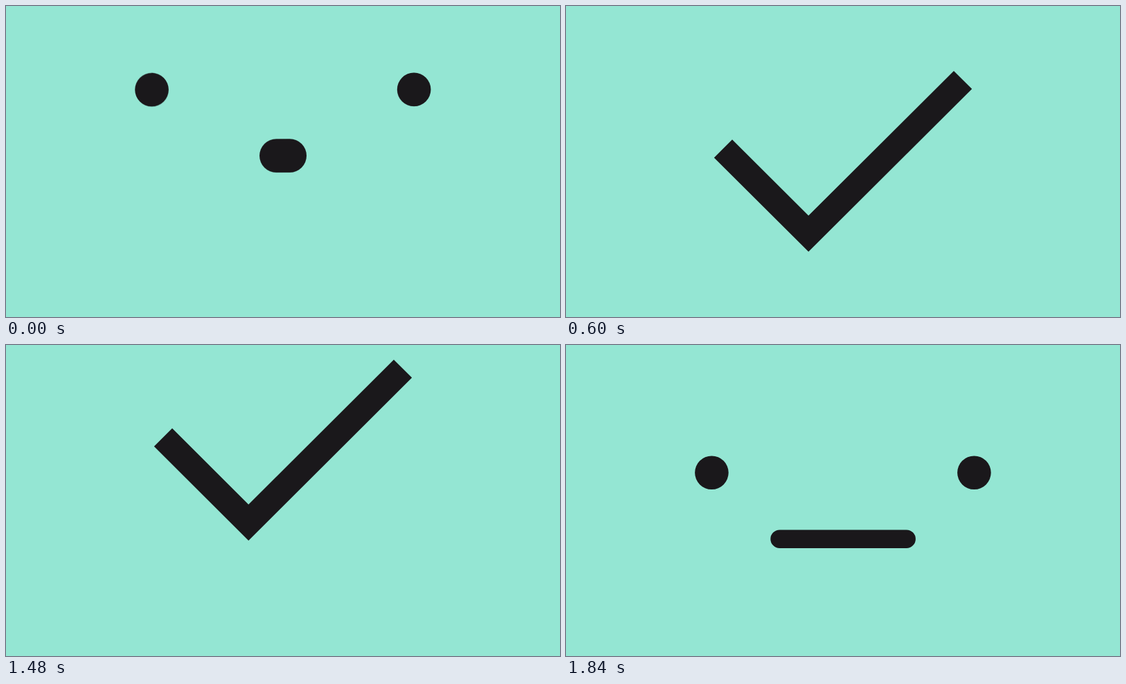
These frames come from a looping animation (800x450 px, 6.84 s). An HTML page with a canvas:

```html
<!DOCTYPE html>
<html lang="en">
<head>
<meta charset="utf-8">
<title>Face and check mark</title>
<style>
  html, body { margin: 0; width: 100%; height: 100%; overflow: hidden; background: #94e6d3; }
  canvas { display: block; width: 800px; height: 450px; }
</style>
</head>
<body>
<canvas id="stage" width="800" height="450"></canvas>
<script>
const W = 800, H = 450, LOOP = 6840, STEP = 40;
const BG = '#94e6d3', INK = '#1a181b';
const LAND = 320, DONE = 600;                      // parts reach the arms, mark complete
const RISE = 1300, SWAP = 1560, REST = 1820;       // mark leaves, face arrives
const R = 24.3, HALF = 18.5, SAMPLES = 16, SHUTTER = 20;

const ctx = document.getElementById('stage').getContext('2d');
const layer = document.createElement('canvas');
layer.width = W;
layer.height = H;
const ink = layer.getContext('2d');

const lerp = (a, b, k) => a + (b - a) * k;
const mix = (p, q, k) => [lerp(p[0], q[0], k), lerp(p[1], q[1], k)];
const smooth = x => x * x * (3 - 2 * x);
const spread = x => x * (1.3 + 0.4 * x - 0.7 * x * x);

// Positions along the mark: 0 is the corner, negative runs up the short arm.
const CORNER = [350.2, 329.4], SHORT = 174.2;
const at = s => [CORNER[0] + s * Math.SQRT1_2, CORNER[1] - Math.abs(s) * Math.SQRT1_2];

const mark = new Path2D('M240 193.2 350.2 303.3 560 94 586.2 120 350.2 355.6 213.8 219.4Z');

// home: cap centres on the face; from/to: cap positions along the mark
const parts = [
  { home: [[210.4, 120.8], [210.4, 120.8]], from: [27.6 - SHORT, 35 - SHORT], to: [10 - SHORT, 110 - SHORT], tilt: Math.PI / 4 },
  { home: [[589.3, 120.8], [589.3, 120.8]], from: [262, 278], to: [180, 308], tilt: -Math.PI / 4 },
  { home: [[390.4, 216.4], [409.7, 216.4]], from: [52, 77], to: [-55, 238] }
];

function capsule(c, points) {
  c.beginPath();
  points.forEach(p => c.lineTo(p[0], p[1]));
  c.lineTo(points[points.length - 1][0] + 0.01, points[points.length - 1][1]);
  c.lineWidth = 2 * R;
  c.lineCap = c.lineJoin = 'round';
  c.stroke();
}

function travel(c, part, k) {
  const [a, b] = part.home.map((p, i) => mix(p, at(part.from[i]), k));
  const tilt = part.tilt ?? Math.atan2(b[1] - a[1], b[0] - a[0]);
  const w = lerp(R + 1, HALF, k);
  c.save();
  c.translate(a[0], a[1]);
  c.rotate(tilt);
  c.beginPath();
  c.rect(-400, -w, 800, 2 * w);
  c.rotate(-tilt);
  c.translate(-a[0], -a[1]);
  c.clip();
  capsule(c, [a, b]);
  c.restore();
}

function grow(c, part, k) {
  const [a, b] = part.from.map((s, i) => lerp(s, part.to[i], k));
  c.save();
  c.clip(mark);
  capsule(c, a < 0 && b > 0 ? [at(a), CORNER, at(b)] : [at(a), at(b)]);
  c.restore();
}

function morph(t) {
  ink.globalCompositeOperation = 'source-over';
  ink.globalAlpha = 1;
  ink.clearRect(0, 0, W, H);
  ink.globalCompositeOperation = 'lighter';
  ink.globalAlpha = 1 / SAMPLES;
  ink.strokeStyle = INK;
  for (let i = 0; i < SAMPLES; i++) {
    const now = t + SHUTTER * i / SAMPLES;
    for (const part of parts) {
      if (now < LAND) travel(ink, part, smooth(now / LAND));
      else grow(ink, part, spread((now - LAND) / (DONE - LAND)));
    }
  }
  // Flatten the summed samples to one colour
  ink.globalCompositeOperation = 'source-in';
  ink.globalAlpha = 1;
  ink.fillStyle = INK;
  ink.fillRect(0, 0, W, H);
  ctx.drawImage(layer, 0, 0);
}

function face(dy) {
  ctx.beginPath();
  ctx.arc(210.4, 184.7 + dy, R, 0, 2 * Math.PI);
  ctx.closePath();
  ctx.moveTo(589.4 + R, 184.7 + dy);
  ctx.arc(589.4, 184.7 + dy, R, 0, 2 * Math.PI);
  ctx.roundRect(295.3, 267.4 + dy, 209.6, 26.6, 13.3);
  ctx.fill();
}

const shift = x => 244.5 * Math.pow(Math.max(0, x), 3.3);

function draw(t) {
  ctx.fillStyle = BG;
  ctx.fillRect(0, 0, W, H);
  ctx.fillStyle = INK;
  if (t < DONE) {
    morph(t);
  } else if (t <= SWAP) {
    ctx.save();
    ctx.translate(0, -shift((t - RISE) / (SWAP - RISE)));
    ctx.fill(mark);
    ctx.restore();
  } else {
    face(shift((REST - t) / (REST - SWAP)));
  }
}

const start = performance.now();
let shown = -1;
function tick() {
  const t = Math.floor((performance.now() - start) % LOOP / STEP) * STEP;
  if (t !== shown) draw(shown = t);
  requestAnimationFrame(tick);
}
tick();
</script>
</body>
</html>
```
